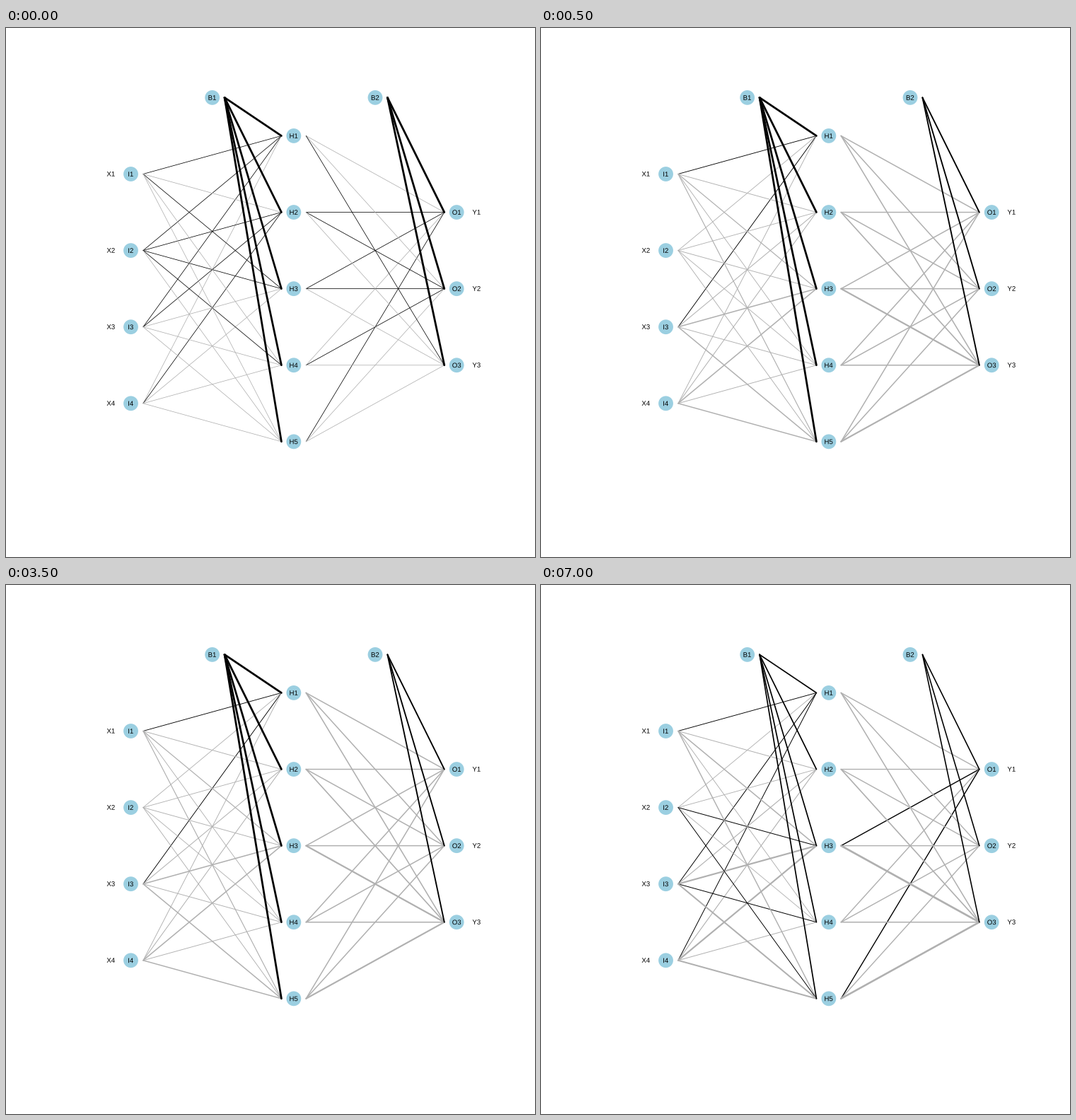
A matplotlib script for the animation above (8000 ms loop, 748x748 px).

```python
import matplotlib.pyplot as plt
from matplotlib.animation import FuncAnimation
from matplotlib.patches import Circle, PathPatch
from matplotlib.textpath import TextPath
from matplotlib.transforms import Affine2D

SIZE, DPI = 748, 100
PX = 72 / DPI                 # points per pixel
STEP = 500                    # ms per frame
ROW, COL = 108.1, 230.35      # node spacing
LEFT, TOP, GAP = 176.5, 98.4, 17.4
BLUE, GREY = "#9bcfe1", "#b0b0b0"

# letter: (column, row of the first node, first number, node count)
GROUPS = {"I": (0, 1, 1, 4), "H": (1, .5, 1, 5), "O": (2, 1.5, 1, 3),
          "B1": (.5, 0, 1, 1), "B2": (1.5, 0, 2, 1)}
LAYERS = [("I", "H"), ("B1", "H"), ("H", "O"), ("B2", "O")]

# How strongly each node pulls its links wide as training goes on.
PULL = {"I": (.5, .1, 1, 1), "H": (.1, .2, 1, .1, .9), "O": (0, 0, 1),
        "B1": (0,), "B2": (0,)}

# Start time, gain, resting width for each layer, positive links.
STAGES = [
    (0, 0, (.75, 2.75, .75, 2.8),
     "I1H1 I1H3 I2H1 I2H2 I2H3 I2H4 I3H1 I3H2 I4H2 "
     "H1O3 H2O1 H2O2 H3O1 H3O2 H4O2 H5O1"),
    (500, .7, (.85, 2.75, 1.5, 1.9), "I1H1 I3H1"),
    (5500, 1.3, (.85, 1.7, 1.4, 1.6),
     "I1H1 I2H3 I2H5 I3H1 I3H4 I4H1 H3O1 H5O1"),
]

fig = plt.figure(figsize=(SIZE / DPI, SIZE / DPI), dpi=DPI, facecolor="white")
ax = fig.add_axes([0, 0, 1, 1])
ax.set(xlim=(0, SIZE), ylim=(SIZE, 0))
ax.axis("off")


def nodes(group):
    """Yield the name and centre of each node in a group."""
    col, row, first, count = GROUPS[group]
    for i in range(count):
        yield (f"{group[0]}{first + i}",
               LEFT + COL * col, TOP + ROW * (row + i))


def label(x, y, text):
    path = TextPath((0, 0), text, size=9.6, prop={"family": "Liberation Sans"})
    box = path.get_extents()
    place = Affine2D().translate(-(box.x0 + box.x1) / 2, 0).scale(1, -1)
    place.translate(x, y + 3.4)
    ax.add_patch(PathPatch(place.transform_path(path), fc="black", lw=0,
                           zorder=500))


for group in GROUPS:
    for name, x, y in nodes(group):
        ax.add_patch(Circle((x, y), 10.4, fc=BLUE, lw=0, zorder=400))
        label(x, y, name)
for group, shift, letter in (("I", -28.3, "X"), ("O", 28, "Y")):
    for name, x, y in nodes(group):
        label(x + shift, y - .3, letter + name[1])

links = []                    # (line, layer, link name, joint pull)
for k, (start, end) in enumerate(LAYERS):
    for j, (b, x1, y1) in enumerate(nodes(end)):
        for i, (a, x0, y0) in enumerate(nodes(start)):
            line, = ax.plot([x0 + GAP, x1 - GAP], [y0, y1], snap=False,
                            solid_capstyle="round", zorder=2 + len(links))
            links.append((line, k, a + b, PULL[start][i] * PULL[end][j]))


def update(frame):
    stage = [s for s in STAGES if s[0] <= frame * STEP][-1]
    _, gain, rest, positive = stage
    for line, k, name, pull in links:
        line.set_linewidth((rest[k] + gain * pull) * PX)
        dark = name[0] == "B" or name in positive.split()
        line.set_color("black" if dark else GREY)
    return [link[0] for link in links]


anim = FuncAnimation(fig, update, frames=16, interval=STEP,
                     repeat=True, repeat_delay=0, blit=False)
plt.show()
```
